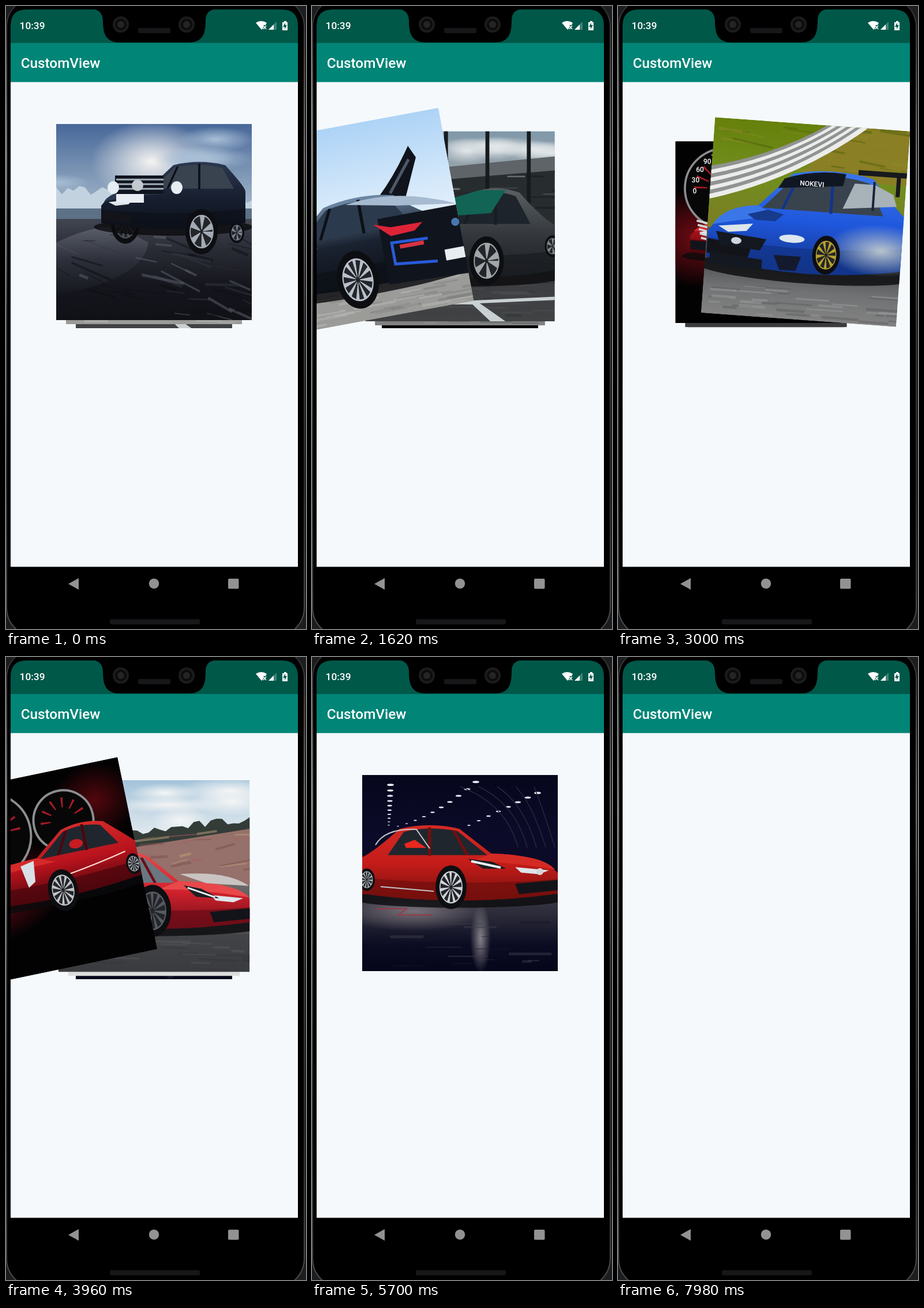
Animation, 520 px wide and 1077 px high, one loop 8040 ms. Source, as an HTML page:

```html
<!DOCTYPE html>
<html lang="en">
<head>
<meta charset="utf-8">
<title>CustomView</title>
<style>
  html, body { margin: 0; width: 100%; height: 100%; overflow: hidden; background: #1c1d1f; }
  svg { display: block; width: 520px; height: 1077px; }
  text { font-family: Roboto, sans-serif; font-weight: 500; fill: #fff; }
</style>
</head>
<body>
<svg id="stage" viewBox="0 0 520 1077"></svg>
<script>
const SIZE = 339, CENTER_X = 256.5, CENTER_Y = 373.5;
const LOOP = 8040, STEP = 60, SWIPE = 540, REACH = 249, FLIGHT = 500;

// Shapes
const path = (fill, d, more = '') => `<path fill="${fill}" d="${d}" ${more}/>`;
const line = (color, width, d, more = '') => path('none', d, `stroke="${color}" stroke-width="${width}" ${more}`);
const box = (fill, x, y, w, h, r = 0) =>
  `<rect fill="${fill}" x="${x}" y="${y}" width="${w}" height="${h}" rx="${r}"/>`;
const oval = (fill, x, y, rx, ry = rx, more = '') =>
  `<ellipse fill="${fill}" cx="${x}" cy="${y}" rx="${rx}" ry="${ry}" ${more}/>`;
const repeat = (n, draw) => Array.from({ length: n }, (_, i) => draw(i)).join('');

let defs = '', ids = 0, seed = 7;
const random = () => (seed = seed * 16807 % 2147483647) / 2147483647;
const fade = (...colors) => {
  const id = 'fade' + ids++;
  defs += `<linearGradient id="${id}" x2="0" y2="1">` + colors.map((c, i) =>
    `<stop offset="${i / (colors.length - 1)}" stop-color="${c}"/>`).join('') + '</linearGradient>';
  return `url(#${id})`;
};
const glow = (color, x, y, rx, ry) => {
  const id = 'glow' + ids++;
  defs += `<radialGradient id="${id}"><stop stop-color="${color}"/>` +
    `<stop offset="1" stop-color="${color}" stop-opacity="0"/></radialGradient>`;
  return oval(`url(#${id})`, x, y, rx, ry);
};

// Scenery
const backdrop = (sky, horizon, ground) =>
  box(fade(...sky), 0, 0, SIZE, horizon) + box(fade(...ground), 0, horizon, SIZE, SIZE - horizon);
const streaks = (colors, top, bottom, count, tilt) => repeat(count, i => {
  const x = random() * SIZE, y = top + random() * (bottom - top), length = 15 + random() * 60;
  return line(colors[i % colors.length], 1 + random() * 4, `M${x} ${y}l${length} ${length * tilt * random()}`, 'opacity=".5"');
});
const clouds = (color, height, count) =>
  repeat(count, () => glow(color, random() * SIZE, random() * height, 40 + random() * 70, 12 + random() * 14));
const ridge = (color, left, right, rough, base) => path(color, `M0 ${base}` + repeat(35, i =>
  `L${i * 10} ${left + (right - left) * i / 34 - random() * rough}`) + `V${base}Z`);

const wheel = (x, y, r, rim, spokes = 10) =>
  `<g transform="translate(${x} ${y}) scale(${r} ${r * 1.4})">` +
  oval('#0d0e11', 0, 0, 1) + oval('#23252a', 0, 0, .74) +
  `<circle r=".4" fill="none" stroke="${rim}" stroke-width=".6" pathLength="${spokes}" stroke-dasharray=".4 .6"/>` +
  `<circle r=".71" fill="none" stroke="${rim}" stroke-width=".06"/></g>`;

// Drawn in a 100 x 100 box with the nose on the right; rear and front are the ends of the roof
const car = (tail, nose, top, bottom, rear, front, [light, paint, dark], glass = '#20262e') => {
  const middle = (rear + front) / 2;
  return `<g transform="translate(${tail} ${top}) scale(${(nose - tail) / 100} ${(bottom - top) / 100})">` +
    oval('#0a0a0d', 50, 92, 55, 12, 'opacity=".8"') +
    path(fade(light, paint, dark), `M0 86V42Q${rear - 14} 36 ${rear} 5Q${middle} -4 ${front} 5L${front + 16} 36Q92 38 100 62V86Q50 104 0 86Z`) +
    path(light, `M${front + 16} 36Q92 38 98 56Q75 46 ${front + 6} 46Z`) +
    path(glass, `M${rear - 6} 38L${rear + 2} 9Q${middle} 1 ${front - 1} 8L${front + 14} 38Z`) +
    line(dark, 1.5, `M${middle} 3V39M${front - 3} 7L${front + 4} 38`) +
    path(dark, 'M0 66Q50 78 100 68V86Q50 104 0 86Z', 'opacity=".75"') +
    path('#121419', 'M78 74L100 69V82L80 87Z') +
    path('#dde5ea', 'M78 53L95 57 90 62 81 60Z') + '</g>';
};

const offRoad = () =>
  backdrop(['#48689a', '#7892b2', '#a9bccd'], 155, ['#454a55', '#2a2c35', '#15161d', '#101117']) +
  glow('#f4f3f1', 165, 65, 105, 70) + clouds('#a9bfd6', 110, 4) +
  ridge('#c3d2df', 122, 138, 18, 155) + box('#5c7186', 0, 146, SIZE, 18) +
  path(fade('#5b5f6b', '#2c2f39', '#15171d'), 'M0 205Q60 175 110 178L160 205Q150 270 0 295Z') +
  streaks(['#111319', '#5f636e', '#0c0d12', '#33363f'], 190, 335, 55, .6) +
  wheel(120, 172, 25, '#4b515c') +
  car(328, 78, 65, 188, 14, 50, ['#2c3850', '#182031', '#0d111a'], '#38434f') +
  box('#10141f', 102, 89, 84, 32) + repeat(3, i => line('#a2afbb', 3, `M104 ${96 + i * 8}h82`)) +
  oval('#c3c9cf', 141, 106, 10) + box('#e8edf3', 104, 121, 48, 15) +
  [99, 209].map(x => oval('#e6eef3', x, 110, 10, 11)).join('') +
  wheel(252, 186, 28, '#a4abb5', 5) + wheel(313, 188, 13, '#7b8490', 5);

const wingDoor = () =>
  backdrop(['#add3f6', '#d4e8fa', '#f4f7fa'], 245, ['#6c6e70', '#9b9b9a', '#9b9b98']) +
  streaks(['#7d7d7c', '#b9b9b7'], 280, 338, 45, 0) +
  path('#11141c', 'M210 132Q244 100 275 55L285 77 256 140Z') +
  line('#4d5868', 5, 'M230 130L272 78') +
  car(344, -20, 126, 290, 30, 64, ['#6f89a8', '#1a2230', '#0d1017'], '#2c3a4d') +
  path('#a7bbd0', 'M150 136Q240 122 339 168L237 153Z') +
  path('#10141d', 'M200 170H339V290L200 285Z') +
  path('#dd2437', 'M191 178L220 188 276 189 260 201 218 203Z') +
  line('#285bd8', 5, 'M280 218L217 215V252L290 260') + line('#d83342', 7, 'M230 224H272') +
  box('#e7edf1', 305, 243, 34, 19) + oval('#4777ae', 332, 199, 7) +
  wheel(45, 235, 28, '#a8b0ba') + wheel(148, 267, 36, '#b8c1ca');

const estate = () =>
  backdrop(['#7f98aa', '#a6aaaa', '#303536'], 215, ['#333538', '#3c3e41', '#404244']) +
  clouds('#e2e7e9', 45, 6) +
  path('#5e6468', 'M0 78L339 45V75L0 103Z') + path('#272c2e', 'M0 98L339 70V215H0Z') +
  streaks(['#a9afa9', '#14181a', '#6d7472'], 75, 140, 22, 0) +
  repeat(4, i => box('#171b1d', 67 + i * 74, 0, 7, 155)) +
  streaks(['#4c4e50', '#303235'], 230, 335, 40, 0) +
  path('#c9d0d1', 'M60 308L339 295V301L205 307 251 339H224L192 309Z') +
  car(348, 20, 101, 270, 22, 48, ['#5b6063', '#35393e', '#1a1c20'], '#1d242b') +
  path('#126455', 'M95 138L205 105H251L225 146 126 153Z') +
  wheel(217, 231, 31, '#a1a6a8', 5) + wheel(335, 205, 14, '#85898c', 5);

const rally = () =>
  backdrop(['#66800b', '#718e1d', '#7c7c25'], 190, ['#54585b', '#46494c', '#707172', '#838383']) +
  path('#8a7f24', 'M225 0H339V95H150Z') + streaks(['#51620d', '#8c8c2a'], 0, 80, 30, .2) +
  repeat(8, i => line(i % 2 ? '#ececeb' : '#8f9391', 8, `M0 ${88 + i * 7}Q${115 + i * 4} ${60 + i * 5} ${206 + i * 8} -2`)) +
  streaks(['#9c9e9f', '#5b5e60'], 285, 335, 35, 0) +
  box('#17191d', 255, 73, 84, 9) + box('#17191d', 322, 80, 7, 35) +
  car(352, 2, 78, 268, 20, 60, ['#3a76e8', '#1f57dd', '#123489'], '#39434d') +
  path('#a7b2b9', 'M232 142L250 97H285L318 112 325 132Z') + line('#17243a', 4, 'M284 92V142') +
  path('#111722', 'M128 97Q180 77 234 82L230 103 118 114Z') +
  '<text x="176" y="107" font-size="12" font-weight="700" text-anchor="middle">NOKEVI</text>' +
  path('#163b8d', 'M68 163L103 153 131 159 117 172H83Z') +
  path('#141820', 'M16 196L104 204 94 224 25 219ZM8 232L99 240V258L8 252Z') + oval('#ced5df', 52, 210, 9, 6) +
  path('#141a2e', 'M118 230H166L158 255H130Z') + oval('#dce7ef', 148, 200, 22, 7) +
  glow('#b8c4ce', 303, 210, 95, 45) + wheel(209, 224, 24, '#b6a22d', 8);

const sedan = () =>
  box('#020203', 0, 0, SIZE, SIZE) + glow('#7c0c15', 60, 180, 150, 95) + glow('#52070d', 285, 65, 75, 65) +
  [[92, 74], [225, 52]].map(([x, r]) => oval('#070708', x, 88, r, r, 'stroke="#8b8d8f" stroke-width="4"') +
    line('#a81a25', r / 3, `M${x - r * .6} 88A${r * .6} ${r * .6} 0 0 1 ${x + r * .6} 88`, 'stroke-dasharray="3 14"')).join('') +
  repeat(5, i => {
    const angle = Math.PI - .09 + i * .35;
    return `<text x="${92 + 56 * Math.cos(angle)}" y="${92 + 60 * Math.sin(angle)}" font-size="13" text-anchor="middle">${i * 30}</text>`;
  }) +
  car(342, 28, 97, 224, 16, 40, ['#d42a29', '#b9131d', '#4c060d']) +
  repeat(5, i => line('#d1d5d7', 4, `M${40 + i * 2} ${148 + i * 8}l20 5`)) +
  path('#d9e0e5', 'M136 151L160 146 156 182 143 190Z') + oval('#c71c24', 238, 132, 12, 8) +
  line('#ffdad2', 2, 'M215 181Q270 173 319 162') +
  wheel(200, 206, 26, '#c1c4c6') + wheel(329, 186, 13, '#abafb1');

const roadster = () =>
  backdrop(['#a3c3da', '#dfe8ed', '#cbd9e2'], 185, ['#6b6868', '#444548', '#3a3b3e']) +
  clouds('#f4f5f5', 85, 10) +
  ridge('#343c38', 118, 76, 16, 185) + path('#96706a', 'M0 140L339 86V185H0Z') +
  streaks(['#b9a478', '#a75e60', '#7c4f4d'], 95, 160, 35, -.3) +
  streaks(['#59595b', '#333437'], 200, 335, 45, .05) +
  car(-2, 345, 127, 270, 28, 46, ['#e8484a', '#d3222d', '#6d0d17'], '#6a7780') +
  path('#c9c4c2', 'M215 166Q300 160 338 187L262 182Z') +
  path('#1b2027', 'M222 186L254 192 285 209 244 206Z') + line('#eff4f4', 3, 'M229 190L278 207') +
  wheel(10, 235, 13, '#60656b') + wheel(167, 231, 33, '#565a60');

const crossover = () =>
  backdrop(['#020203', '#020203'], 280, ['#a0a0a2', '#d6d6d6', '#dedede']) +
  car(328, -2, 145, 285, 20, 52, ['#a82b36', '#8f1d27', '#3d0d12']) +
  line('#e0e5ea', 4, 'M12 224L72 216') + line('#c9656a', 4, 'M13 233L36 240 47 256') +
  wheel(134, 251, 25, '#aaaeb2') + wheel(302, 242, 16, '#92979d');

const showroom = () =>
  backdrop(['#06061c', '#0b0b29', '#0a0a26'], 205, ['#3c3c47', '#262635', '#0b0b22', '#06061a']) +
  repeat(10, i => {
    const size = 6 - i * .45, ceiling = (x, y) => oval('#e3e8f1', x, y, size, size / 3);
    return ceiling(49 - i / 3, 17 + i * 10 - i * i * .25) + ceiling(197 - i * 15, 12 + i * 13 - i * i * .5) + ceiling(304 - i * 17, 31 + i * 8);
  }) +
  repeat(5, i => line('#25283c', 1.5, `M${170 + i * 32} 20Q${250 + i * 15} 50 ${270 + i * 16} 125`)) +
  glow('#777079', 90, 235, 130, 35) + glow('#858087', 205, 282, 18, 60) +
  streaks(['#17172a', '#3d3d4b'], 245, 330, 18, 0) + line('#953b44', 2, 'M25 231H77L62 242H121') +
  car(-4, 341, 86, 224, 20, 50, ['#d42a24', '#c51c19', '#740f0d']) +
  line('#c5c8cc', 2, 'M23 121Q40 92 94 94L117 127') + path('#e7281f', 'M73 119L91 112 111 126H76Z') +
  path('#1b1d22', 'M183 145L226 150 250 162H210Z') + line('#eef3f7', 4, 'M189 149L240 160') +
  oval('#d5d5d8', 308, 167, 6) + line('#bfc4ca', 2, 'M32 193L124 201') +
  wheel(8, 181, 14, '#b5bac0') + wheel(154, 194, 27, '#d0d4d8');

// Each card: drawing, swipe start in ms, swipe direction
const cards = [
  [offRoad, 510, 1], [wingDoor, 1302, -1], [estate, 2040, 1], [rally, 2800, 1],
  [sedan, 3623, -1], [roadster, 4393, 1], [crossover, 5130, -1], [showroom, 5760, 1]
];

const phone =
  `<rect x="1" y="-14" width="516" height="1104" rx="50" fill="#000" stroke="${fade('#2e2e30', '#77797b', '#3b3c3e', '#2c2d2f', '#4c4d4f')}" stroke-width="2"/>` +
  path('#005849', 'M8 64V34Q8 6 36 6H478Q506 6 506 34V64Z') +
  path('#000', 'M148 5Q167 6 168 25C168 50 174 63 198 63H316C340 63 346 50 346 25Q346 6 366 5Z') +
  [199, 313].map(x => repeat(3, i => oval(['#1c1c1d', '#0c0c0d', '#242426'][i], x, 32, 14 - i * 4))).join('') +
  box('#171719', 229, 38, 56, 9, 3) +
  '<text x="23.6" y="40" font-size="17.3">10:39</text>' +
  path('#fff', 'M433 29Q442 23 452 29L450 33H446V38L443 41Z') + line('#fff', 1.5, 'M446 34L451 40M451 34L446 40') +
  path('#418277', 'M455 41L469 27V41Z') + path('#fff', 'M455 41L464 32V41Z') +
  path('#fff', 'M479 28H482V26H486V28H488V42H479Z') + path('#005849', 'M484 29L480 36H483V40L487 33H484Z') +
  box('#008577', 8, 64, 498, 68) + '<text x="25.7" y="107" font-size="24.3">CustomView</text>' +
  box('#f5f9fc', 8, 131.5, 498, 838) +
  path('#929292', 'M126 989V1009L108 999Z') + oval('#929292', 256.5, 998.5, 8.7) +
  box('#929292', 385, 990, 18.5, 17.5, 2) + box('#171719', 180, 1060, 156, 9, 3);

const deck = cards.map(([draw]) => `<g class="card" clip-path="url(#square)">${draw()}</g>`).reverse().join('');
document.getElementById('stage').innerHTML =
  `<defs>${defs}<clipPath id="square">${box('#000', 0, 0, SIZE, SIZE)}</clipPath>` +
  `<clipPath id="screen">${box('#000', 8, 131.5, 498, 838)}</clipPath></defs>` +
  `${phone}<g clip-path="url(#screen)">${deck}</g>`;
const nodes = [...document.querySelectorAll('.card')].reverse();

function render(now) {
  const time = Math.floor(now % LOOP / STEP) * STEP;
  let swiped = 0;
  cards.forEach(([, start, side], i) => {
    const phase = Math.min(1, Math.max(0, (time - start) / SWIPE));
    const dx = side * FLIGHT * phase ** 2;
    const depth = Math.min(2, Math.max(0, i - swiped));
    nodes[i].setAttribute('transform',
      `translate(${CENTER_X + dx} ${CENTER_Y + 24 * depth}) rotate(${15 * dx / REACH}) ` +
      `scale(${1 - depth / 10}) translate(${-SIZE / 2} ${-SIZE / 2})`);
    nodes[i].style.display = phase < 1 ? '' : 'none';
    swiped += Math.min(1, Math.abs(dx) / REACH);
  });
}

const origin = performance.now();
const tick = () => {
  render(performance.now() - origin);
  requestAnimationFrame(tick);
};
tick();
</script>
</body>
</html>
```
